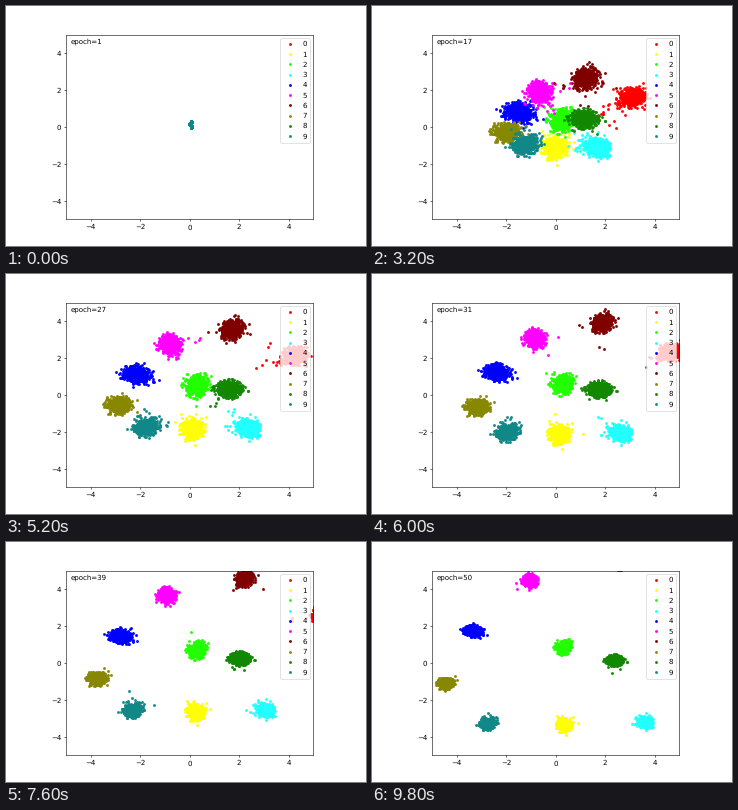
Animation, 360 px wide and 240 px high, one loop 10000 ms. Source, as a matplotlib script:

```python
import numpy as np
import matplotlib.pyplot as plt
from matplotlib.animation import FuncAnimation

EPOCHS = 50
UNFOLDED = 9      # epoch at which the streak has opened into clusters
CORE = 650

# Colour, centre when unfolded, centre at the last epoch
CLASSES = [
    ("#ff0000", (1.60, 1.10), (6.30, 3.20)),
    ("#ffff00", (-.20, -.35), (.35, -3.35)),
    ("#22ff00", (.20, .25), (.30, .87)),
    ("#22ffff", (.75, -.40), (3.62, -3.20)),
    ("#0000ff", (-.65, .50), (-3.35, 1.75)),
    ("#ff00ff", (-.50, 1.05), (-1.05, 4.50)),
    ("#800000", (.55, 1.75), (2.60, 5.45)),
    ("#888800", (-.85, .00), (-4.45, -1.10)),
    ("#118800", (.58, .55), (2.38, .15)),
    ("#108888", (-.50, -.15), (-2.75, -3.25)),
]
COLORS, STARTS, ENDS = zip(*CLASSES)
STARTS, ENDS = np.array(STARTS), np.array(ENDS)


def centres(epoch):
    """Clusters drift outwards, slowing down, sideways a little sooner."""
    t = (epoch - UNFOLDED) / (EPOCHS - UNFOLDED)
    return STARTS + (ENDS - STARTS) * t ** np.array([.7, .85])


def core(k, epoch):
    """Round cloud, stretched along the cluster's direction from the origin."""
    z = np.random.default_rng(k).normal(size=(CORE, 2)) * [.26, .21]
    ux, uy = ENDS[k] / np.hypot(*ENDS[k])
    tight = np.interp(epoch, [22, 46], [1, .58])
    return centres(epoch)[k] + tight * z @ np.array([[ux, uy], [-uy, ux]])


def strays(k, epoch):
    """Few and fewer points on the way to the three nearest clusters."""
    rng = np.random.default_rng(100 * epoch + k)
    age = epoch - UNFOLDED
    count = 2 + int(60 * np.exp(-age / 12))
    reach = .9 * np.exp(-age / 25)
    mids = centres(epoch)
    nearest = np.argsort(np.hypot(*(mids - mids[k]).T))[1:4]
    goals = mids[rng.choice(nearest, count)]
    u = reach * rng.random((count, 1)) ** 1.3
    return mids[k] + u * (goals - mids[k]) + rng.normal(0, .15, (count, 2))


def features(k, epoch):
    late = max(epoch, UNFOLDED)
    points = np.vstack([core(k, late), strays(k, late)])
    if epoch < UNFOLDED:
        # Early on everything unfolds from one small streak
        u = np.random.default_rng(50 + k).random(len(points))
        streak = np.column_stack([.035 + .045 * np.sin(9 * u), -.03 + .35 * u])
        w = ((epoch - 1) / (UNFOLDED - 1)) ** .75
        points = streak + w * (points - streak)
    return points


plt.rcParams.update({"font.family": "DejaVu Sans", "font.size": 10,
                     "text.hinting": "none"})
fig = plt.figure(figsize=(7.2, 4.8), dpi=50, facecolor="white")
ax = fig.add_axes([60 / 360, 26.7 / 240, 247.4 / 360, 184.5 / 240])
ax.set(xlim=(-5, 5), ylim=(-5, 5),
       xticks=range(-4, 5, 2), yticks=range(-4, 5, 2))
dots = [ax.plot([], [], ".", color=c, label=str(k))[0]
        for k, c in enumerate(COLORS)]
ax.legend(loc="upper right")
caption = ax.text(-4.8, 4.5, "")


def update(i):
    epoch = i + 1
    for k, line in enumerate(dots):
        line.set_data(*features(k, epoch).T)
    caption.set_text(f"epoch={epoch}")
    return dots + [caption]


anim = FuncAnimation(fig, update, frames=EPOCHS, interval=200,
                     repeat=True, repeat_delay=0, init_func=lambda: update(0))
plt.show()
```
